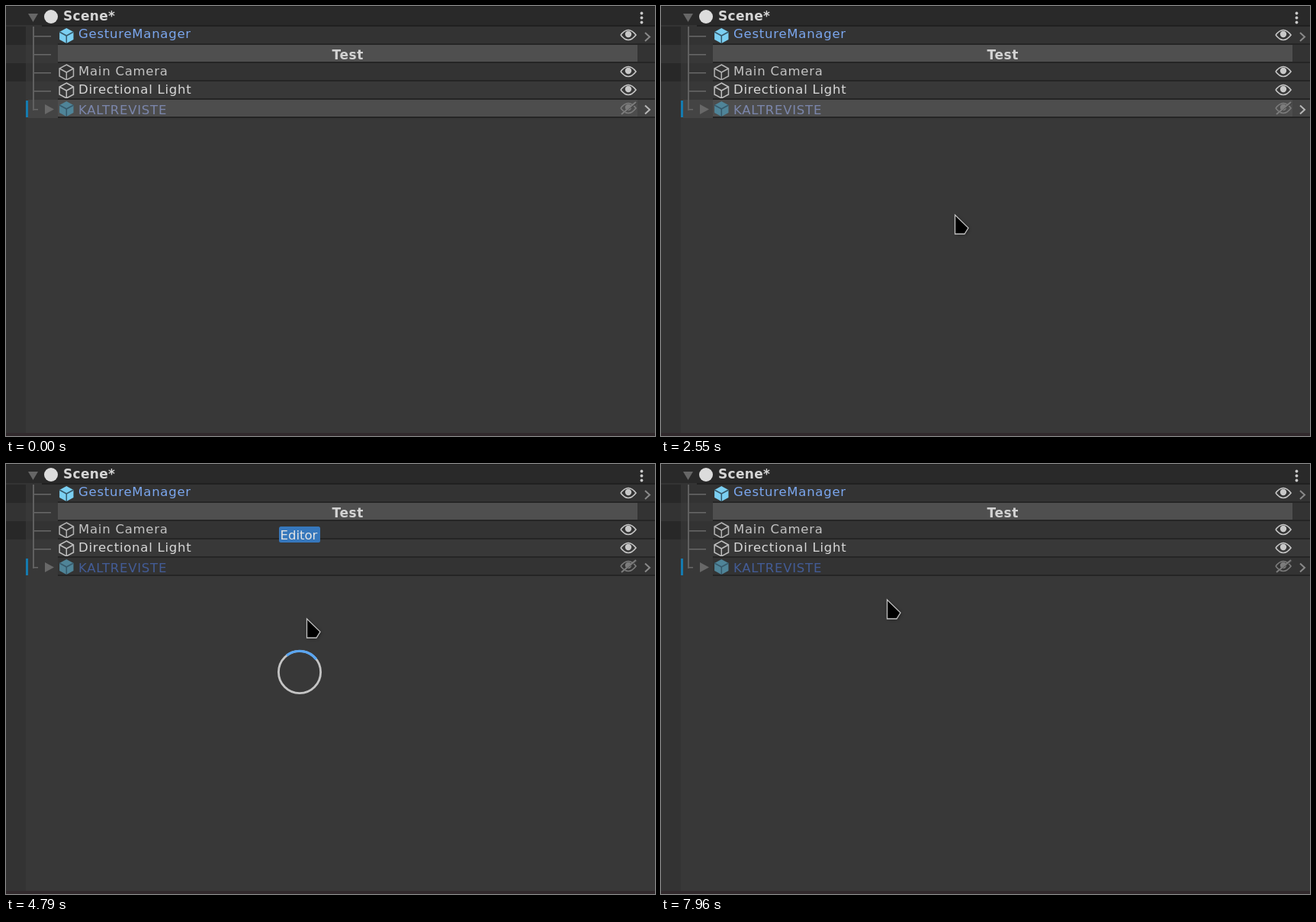
Animation of 851x564 px, one loop 8000 ms. Source, as an HTML page with a canvas:

```html
<!DOCTYPE html>
<html lang="en">
<head>
<meta charset="utf-8">
<title>Hierarchy radial menu</title>
<style>
html, body { margin: 0; width: 100%; height: 100%; overflow: hidden; background: #383838; }
canvas { display: block; }
</style>
</head>
<body>
<canvas id="stage" width="851" height="564"></canvas>
<script>
const W = 851, H = 564, LOOP = 8000, STEP = 100;
const DESELECT = 2650, OPEN = 3180, CLOSE = 7130;
const HUB = { x: 385, y: 273, r: 27.6 };
const FONT = '"DejaVu Sans", Verdana, sans-serif';
const ctx = document.getElementById('stage').getContext('2d');

// Each stroke moves the pointer on from where the last one ended; bow bends it sideways.
const ENTRY = { x: 219, y: 545 };
const STROKES = [
  { from: 100, to: 730, x: 427, y: 456 },
  { from: 960, to: 1760, x: 398, y: 297, bow: 21 },
  { from: 1790, to: 2290, x: 385, y: 273 },
  { from: 2550, to: 2650, x: 385, y: 269 },
  { from: 3560, to: 5290, x: 391, y: 180, bow: 6 },
  { from: 5790, to: 6300, x: 391, y: 186 },
  { from: 6300, to: 7030, x: 391, y: 183, bow: 4 },
  { from: 7130, to: 7960, x: 296, y: 177 }
];

const ROWS = [
  { text: 'GestureManager', base: 42, color: '#7ba7ef', cube: '#7bcff2', solid: true },
  { heading: true },
  { text: 'Main Camera', base: 91, color: '#c4c4c4', cube: '#b4b4b4' },
  { text: 'Directional Light', base: 115, color: '#d8d8d8', cube: '#c0c0c0' },
  { text: 'KALTREVISTE', base: 142, color: '#435c96', lit: '#7b86ab', cube: '#4f8498', solid: true, hidden: true }
];

const mix = (a, b, k) => `rgb(${a.map((v, i) => Math.round(v + (b[i] - v) * k)).join()})`;

function box(g, x, y, w, h, color) {
  g.fillStyle = color;
  g.fillRect(x, y, w, h);
}

function fill(g, points, color) {
  g.beginPath();
  points.forEach(([x, y]) => g.lineTo(x, y));
  g.fillStyle = color;
  g.fill();
}

function line(g, points, color, width = 1.5, closed = false) {
  g.beginPath();
  points.forEach(([x, y]) => g.lineTo(x, y));
  if (closed) g.closePath();
  g.strokeStyle = color;
  g.lineWidth = width;
  g.stroke();
}

function disc(g, x, y, r, color) {
  g.beginPath();
  g.arc(x, y, r, 0, Math.PI * 2);
  g.fillStyle = color;
  g.fill();
}

function arc(g, from, to, color, width) {
  g.beginPath();
  g.arc(HUB.x, HUB.y, HUB.r, from, to);
  g.strokeStyle = color;
  g.lineWidth = width;
  g.stroke();
}

function label(g, text, x, y, color, style = '16.5px', spacing = 0.75) {
  g.font = `${style} ${FONT}`;
  g.letterSpacing = spacing + 'px';
  g.fillStyle = color;
  g.fillText(text, x, y);
}

function cube(g, y, color, solid) {
  const x = 79.3;
  const hull = Array.from({ length: 6 }, (_, i) => {
    const a = (i - 1.5) * Math.PI / 3;
    return [x + 10.6 * Math.cos(a), y + 10 * Math.sin(a)];
  });
  if (solid) fill(g, hull, color);
  else line(g, hull, color, 1.5, true);
  const seam = solid ? '#36586a' : color;
  for (const i of [1, 3, 5]) line(g, [[x, y], hull[i]], seam);
}

function eye(g, y, color, slashed) {
  const x = 816;
  g.beginPath();
  g.moveTo(x - 10, y);
  g.quadraticCurveTo(x, y - 13, x + 10, y);
  g.quadraticCurveTo(x, y + 13, x - 10, y);
  g.strokeStyle = color;
  g.lineWidth = 1.6;
  g.stroke();
  disc(g, x, y - 1, 4.2, color);
  if (slashed) {
    line(g, [[x - 8, y + 7], [x + 11, y - 7]], '#404040', 2);
    line(g, [[x - 9, y + 8], [x + 10, y - 8]], color, 2);
  }
}

function drawRow(g, row, i, selected) {
  const y = 27 + 24 * i;
  const lit = selected && row.hidden;
  if (i % 2 === 0) box(g, row.hidden ? 68 : 26, y, W, 24, '#333333');
  if (i === 0 || i === 2) box(g, 0, y, 26, 24, '#282828');
  if (lit) {
    box(g, 29, y, W, 24, '#444444');
    box(g, 68, y, 760, 24, '#4d4d4d');
  }
  if (row.heading) {
    box(g, 828, y, 23, 24, '#333333');
    box(g, 68, y, 760, 23, '#4f4f4f');
    label(g, 'Test', 427.5, y + 43 - 24, '#d2d2d2', 'bold 17px', 0.6);
  } else {
    cube(g, y + 12, row.cube, row.solid);
    label(g, row.text, 95, row.base, lit ? row.lit : row.color);
    eye(g, y + 11, row.hidden ? '#7c7c7c' : '#c8c8c8', row.hidden);
  }
  box(g, 68, y + 22, W, 2, '#252525');
  box(g, 36, y + 12, row.hidden ? 6 : 23, 1.5, '#686868');
  if (row.solid) {
    const c = row.hidden ? y + 13 : y + 13.5;
    line(g, [[838, c - 5.5], [844, c], [838, c + 5.5]], lit ? '#b8b8b8' : '#8a8a8a', 2);
  }
}

function drawTree(g, selected) {
  box(g, 0, 0, W, H, '#383838');
  box(g, 0, 0, 26, H, '#333333');
  ROWS.forEach((row, i) => drawRow(g, row, i, selected));
  box(g, 35, 27, 2, 110, '#606060');
  box(g, 26, 124, 3, 22, '#147bb0');
  fill(g, [[51, 129], [63, 135.5], [51, 142]], '#686868');

  box(g, 0, 0, W, 25, '#292929');
  box(g, 0, 0, W, 1, '#202020');
  box(g, 0, 25, W, 2, '#202020');
  box(g, 0, 25.5, 47, 1, '#484848');
  fill(g, [[29, 10], [42, 10], [35.5, 21]], '#666666');
  disc(g, 59, 14, 9, '#dcdcdc');
  label(g, 'Scene*', 75, 19, '#d6d6d6', 'bold 17px', 0.3);
  for (let i = 0; i < 3; i++) disc(g, 833.5, 9.5 + 6 * i, 1.9, '#c8c8c8');
  box(g, 0, 560, W, 4, '#31292c');
}

function layer(paint) {
  const c = document.createElement('canvas');
  c.width = W;
  c.height = H;
  paint(c.getContext('2d'));
  return c;
}

const active = layer(g => drawTree(g, true));
const idle = layer(g => drawTree(g, false));
const blurred = layer(g => {
  g.drawImage(idle, 0, 0);
  g.beginPath();
  g.rect(47, 2, 675, 556);
  g.clip();
  g.filter = 'blur(0.7px)';
  g.drawImage(idle, 0, 0);
});

function tipAt(t) {
  if (t < STROKES[0].from) return null;
  let { x, y } = ENTRY;
  for (const s of STROKES) {
    if (t < s.from) break;
    const held = Math.floor((t - s.from) / STEP) * STEP;
    const k = t >= s.to ? 1 : 1 - (1 - held / (s.to - s.from)) ** 1.2;
    x += (s.x - x) * k + (s.bow || 0) * Math.sin(Math.PI * k);
    y += (s.y - y) * k;
  }
  return { x: Math.round(x), y: Math.round(y) };
}

function drawMenu(tip) {
  const dx = tip.x - HUB.x, dy = tip.y - HUB.y;
  const reach = Math.hypot(dx, dy);
  const k = reach < 10 ? 0 : Math.min(1, reach / 88);
  arc(ctx, 0, Math.PI * 2, '#c4c4c4', 2.8);
  if (k) {
    const a = Math.atan2(dy, dx);
    arc(ctx, a - Math.PI / 4, a + Math.PI / 4, mix([196, 196, 196], [66, 158, 250], k), 3.4);
  }
  ctx.fillStyle = mix([82, 82, 82], [48, 128, 212], k);
  ctx.beginPath();
  ctx.roundRect(358, 82, 54, 21, 2.5);
  ctx.fill();
  label(ctx, 'Editor', 359.5, 99, '#e4e4e4', '16.5px', 0);
}

function drawPointer({ x, y }) {
  const body = [[0, 0.5], [0, 25.5], [12.5, 25.5], [17.5, 17.5]];
  ctx.save();
  ctx.translate(x + 0.5, y + 0.5);
  ctx.shadowColor = 'rgba(0,0,0,.45)';
  ctx.shadowBlur = 4;
  ctx.shadowOffsetX = ctx.shadowOffsetY = 1;
  fill(ctx, body, '#000');
  ctx.shadowColor = 'transparent';
  line(ctx, body, '#c2c2c2', 1.3, true);
  ctx.restore();
}

function render(t) {
  const open = t >= OPEN && t < CLOSE;
  const tip = tipAt(t);
  ctx.drawImage(t < DESELECT ? active : open ? blurred : idle, 0, 0);
  if (open) drawMenu(tip);
  if (tip) drawPointer(tip);
}

const start = performance.now();
function tick() {
  render((performance.now() - start) % LOOP);
  requestAnimationFrame(tick);
}
tick();
</script>
</body>
</html>
```
